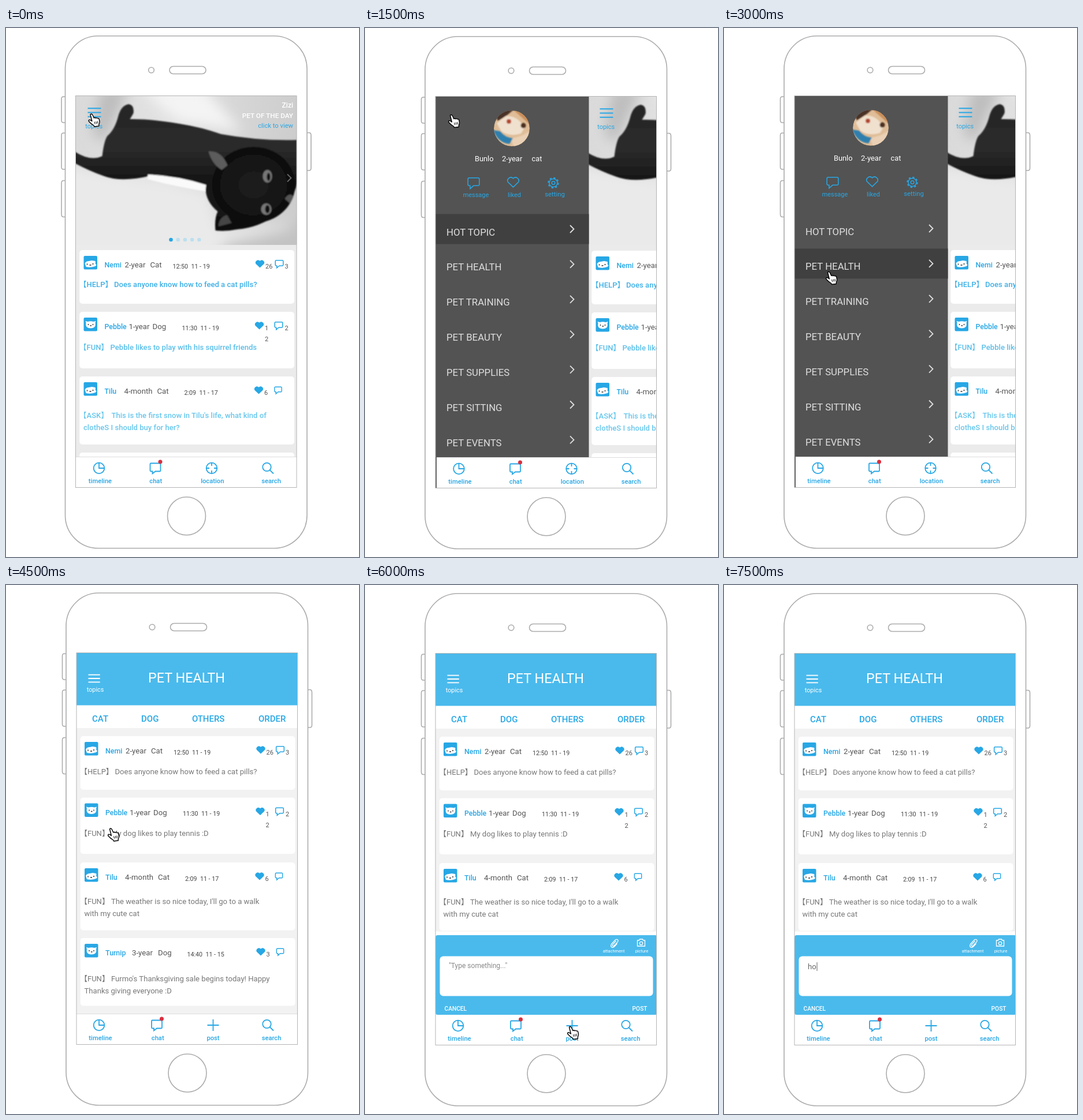
An HTML page for the animation above (8000 ms loop, 611 by 917 pixels).

```html
<!DOCTYPE html>
<html lang="en">
<head>
<meta charset="utf-8">
<title>Pet app walkthrough</title>
<style>
  html, body { margin: 0; width: 100%; height: 100%; overflow: hidden; background: #fff; }
  svg { display: block; width: 100%; height: 100%; }
  text { font-family: Roboto, "Noto Sans CJK SC", "Noto Sans CJK JP", sans-serif; white-space: pre; }
  .line { fill: none; stroke: currentColor; stroke-width: 1.8; }
</style>
</head>
<body>
<svg id="stage" viewBox="0 0 611 917">
  <defs>
    <clipPath id="screen"><rect x="122" y="117" width="383" height="680"/></clipPath>
    <clipPath id="photoClip"><rect x="122" y="118" width="383" height="258"/></clipPath>
    <clipPath id="faceClip"><circle cx="254" cy="173" r="31"/></clipPath>
    <filter id="soft"><feGaussianBlur stdDeviation="1.2"/></filter>
    <filter id="blur"><feGaussianBlur stdDeviation="11"/></filter>
    <linearGradient id="wall"><stop stop-color="#dadada"/><stop offset=".4" stop-color="#e2e2e2"/><stop offset="1" stop-color="#cdcdcd"/></linearGradient>
    <linearGradient id="fur" x2="0" y2="1"><stop stop-color="#262626"/><stop offset=".35" stop-color="#2b2b2b"/><stop offset=".6" stop-color="#161616"/><stop offset="1" stop-color="#101010"/></linearGradient>
    <radialGradient id="head"><stop stop-color="#202020"/><stop offset="1" stop-color="#0e0e0e"/></radialGradient>

    <path id="heart" d="M0 6L-6.5-.3A4 4 0 0 1 0-4.800A4 4 0 0 1 6.5-.3Z"/>
    <path id="bubble" d="M-5-5.5H5Q6.5-5.5 6.5-4V2Q6.5 3.5 5 3.5H0L-4 7V3.5H-5Q-6.5 3.5-6.5 2V-4Q-6.5-5.5-5-5.5Z"/>
    <path id="chevron" class="line" d="M-3.5-6.5L3 0L-3.5 6.5"/>
    <g id="clock" class="line"><circle r="9.3"/><path d="M0-9V0H9"/></g>
    <g id="chat" class="line"><path d="M-7.5-8.5H7.5Q9-8.5 9-7V4Q9 5.5 7.5 5.5H0L-5 9.5V5.5H-7.5Q-9 5.5-9 4V-7Q-9-8.5-7.5-8.5Z"/></g>
    <g id="location" class="line"><circle r="9.3"/><path d="M0-9V-4M0 9V4M-9 0H-4M9 0H4"/></g>
    <g id="search" class="line"><circle cx="-2" cy="-2" r="7.2"/><path d="M3.3 3.3L9.5 9.5"/></g>
    <path id="plus" class="line" d="M-10 0H10M0-10V10"/>
    <g id="gear" class="line" style="stroke-width:1.5"><circle r="2.8"/><circle r="7"/><circle r="8.7" stroke-width="2" stroke-dasharray="3.4 3.43"/></g>
    <path id="clip" class="line" style="stroke-width:1.3" d="M3-4L-3 2.5Q-4 4.5-2 5Q-1 5 0 4L6-2.5Q7.5-5.5 5-6.5Q3-7 1.5-5.5L-5 1.5Q-7 5-4.5 6.8Q-2 8 0 6L5 .5"/>
    <g id="camera" class="line" style="stroke-width:1.3"><path d="M-6.5-4H-3.5L-2.5-6H2.5L3.5-4H6.5V6H-6.5Z"/><circle cy="1" r="2.7"/></g>
    <path id="menu" class="line" style="stroke-width:2" d="M0-7.3H23M0 0H23M0 7.3H23"/>

    <g id="cat">
      <rect width="23.500" height="23.500" rx="2" fill="#27a7e5"/>
      <path fill="#fff" d="M2 13Q4 9 9 9L14 8L20 9Q21 11 20 13L22 16L20 18Q12 21 4 19Z"/>
      <path stroke="#333" stroke-width="1.600" d="M6 13.500v2M16 13v2M10 16h3"/>
    </g>
    <g id="dog">
      <rect width="23.500" height="23.500" rx="2" fill="#27a7e5"/>
      <path fill="#fff" d="M3 6L7 7Q12 5.500 17 7L21 6L20 9Q22 18 12 18.500Q2 18 4 9Z"/>
      <path stroke="#333" stroke-width="1.400" d="M8 11v2M16 11v2M11 14h2.500"/>
    </g>

    <g id="hand" stroke="#000" stroke-linejoin="round" stroke-width="1.4">
      <path fill="#fff" d="M4 2Q6-.5 8 3L10.3 8Q11.8 6.4 13.3 8.2Q15 6.8 16.3 8.6Q18.4 7.8 19.3 10.5L20 14Q20.2 17 18.8 19V22L11 23L10 21Q5.5 18.5 1.5 14Q.3 11.8 2.5 11.2Q4.5 11 6.8 13.5Z"/>
      <path fill="none" stroke-width="1" d="M11 14.5l1.2 4M13.8 14l.9 4M16.4 13.5l.6 4"/>
    </g>

    <g id="phone" fill="#fff" stroke="#acacac" stroke-width="1.6">
      <path d="M104 119H101Q97.5 119 97.5 123V160Q97.5 164 101 164H104M104 182H101Q97.5 182 97.5 186V241Q97.5 245 101 245H104M104 264.5H101Q97.5 264.5 97.5 269V323Q97.5 327.5 101 327.5H104M522 181.5H526Q529.5 181.5 529.5 186V243Q529.5 247 526 247H522"/>
      <rect x="104" y="13.8" width="418.5" height="888" rx="57"/>
      <circle cx="253" cy="73" r="4.8"/>
      <rect x="284.5" y="66.5" width="63" height="13" rx="6.5"/>
      <circle cx="314" cy="846" r="33"/>
    </g>

    <g id="photo" clip-path="url(#photoClip)">
      <rect x="122" y="118" width="383" height="258" fill="url(#wall)"/>
      <g filter="url(#blur)">
        <path fill="#eaeaea" d="M100 235L170 250L260 265L350 285L370 350L520 340L480 400H100Z"/>
        <path fill="#f4f4f4" d="M235 105H345L410 180L300 162Z"/>
        <path fill="#bdbdbd" d="M165 105H215L170 200L150 180Z"/>
        <path fill="#c2c2c2" d="M385 372L490 348L520 325V400H360Z"/>
      </g>
      <g filter="url(#soft)">
        <path fill="url(#fur)" d="M120 214Q148 232 168 222Q171 196 177 187Q190 176 196 152Q201 134 214 132Q224 134 222 148L216 158Q250 157 302 166Q340 172 374 184Q440 196 506 194V268Q498 300 472 322Q440 346 402 349Q382 353 364 351Q362 330 368 318Q346 300 347 275Q300 262 252 256Q202 268 172 257Q146 248 120 234Z"/>
        <ellipse cx="430" cy="272" rx="72" ry="66" fill="url(#head)"/>
        <path fill="#5c5c5c" d="M352 214Q374 212 385 238L375 246Q358 236 352 214Z"/>
        <path fill="#444" d="M369 344Q370 328 384 324L392 338Z"/>
        <path fill="#fafafa" d="M247 254Q300 256 348 272L346 283Q290 274 247 262Z"/>
        <g fill="#777"><ellipse cx="454" cy="257" rx="8" ry="11"/><ellipse cx="452" cy="314" rx="9" ry="10"/></g>
        <g fill="#111"><ellipse cx="456" cy="258" rx="3" ry="7"/><ellipse cx="454" cy="314" rx="4" ry="7"/></g>
        <path fill="#555" d="M484 296Q492 284 499 292L493 304Z"/>
      </g>
    </g>

    <g id="portrait" clip-path="url(#faceClip)">
      <circle cx="254" cy="173" r="31" fill="#dfbd98"/>
      <g filter="url(#soft)">
        <path fill="#4a3327" d="M224 148L242 140H258L246 150L230 160Z"/>
        <path fill="#c98e59" d="M258 142H280L289 170L276 158Z"/>
        <path fill="#f0e1cf" d="M228 164L244 152Q264 150 276 172L270 182Q250 188 236 178Z"/>
        <path fill="#ead0b4" d="M252 190Q272 188 284 178V200L258 206Z"/>
        <path fill="#2d7fae" d="M222 176L234 178Q242 189 256 190L250 200Q230 198 222 176Z"/>
        <circle cx="274" cy="168" r="4.5" fill="#4c2d1c"/><circle cx="249" cy="161" r="4" fill="#b4442d"/>
      </g>
    </g>
  </defs>
</svg>

<script>
const BLUE = '#27a7e5', SKY = '#4abaec';

const text = (x, y, s, size, fill, extra = '') =>
  `<text x="${x}" y="${y}" font-size="${size}" fill="${fill}" ${extra}>${s}</text>`;
const centered = (x, y, s, size, fill) => text(x, y, s, size, fill, 'text-anchor="middle"');
const bold = (x, y, s, size, fill, anchor = 'start') =>
  text(x, y, s, size, fill, `font-weight="500" text-anchor="${anchor}"`);
const rect = (x, y, w, h, fill, rx = 0) =>
  `<rect x="${x}" y="${y}" width="${w}" height="${h}" rx="${rx}" fill="${fill}"/>`;
const icon = (id, x, y, color = BLUE, scale = 1) =>
  `<use href="#${id}" transform="translate(${x} ${y}) scale(${scale})" color="${color}" fill="${color}"/>`;
const outline = (id, x, y, scale, width) =>
  `<use href="#${id}" transform="translate(${x} ${y}) scale(${scale})" fill="none" stroke="${BLUE}" stroke-width="${width}"/>`;
const group = (x, y, content) => `<g transform="translate(${x} ${y})">${content}</g>`;

// Column positions of each author's post header.
const authors = {
  Nemi:   { pet: 'cat', age: '2-year',  kind: 'Cat', cols: [207, 251, 290],   time: '12:50  11 - 19', heart: 441, likes: ['26'],     replies: '3' },
  Pebble: { pet: 'dog', age: '1-year',  kind: 'Dog', cols: [214, 255, 306],   time: '11:30  11 - 19', heart: 440, likes: ['1', '2'], replies: '2' },
  Tilu:   { pet: 'cat', age: '4-month', kind: 'Cat', cols: [206, 263, 310],   time: '2:09  11 - 17',  heart: 439, likes: ['6'],      replies: '' },
  Turnip: { pet: 'dog', age: '3-year',  kind: 'Dog', cols: [218, 263, 313.5], time: '14:40  11 - 15', heart: 441, likes: ['3'],      replies: '' },
};

function post(name, y, height, tag, lines, offset, color, weight) {
  const a = authors[name], grey = '#555';
  const style = `font-weight="${weight}"`;
  const messageX = { HELP: 188.5, FUN: 182, ASK: 184 }[tag];
  return rect(128.7, y, 371.8, height, '#fff', 5) + icon(a.pet, 136, y + 10) +
    bold(172, y + 30, name, 12.4, BLUE) +
    text(a.cols[0], y + 30, a.age, 13.2, grey) + text(a.cols[1], y + 30, a.kind, 13.2, grey) +
    text(a.cols[2], y + 31.5, a.time, 10.7, '#444') +
    icon('heart', a.heart, y + 24, BLUE, 1.1) +
    a.likes.map((n, i) => text(a.heart + 9.5, y + 32 + i * 19, n, 11, grey)).join('') +
    outline('bubble', a.heart + 33.5, y + 23.5, a.replies ? 1.05 : .95, 1.5) +
    text(484, y + 32, a.replies, 11, grey) +
    text(128, y + offset, `【${tag}】`, 13, color, style) +
    lines.map((s, i) => text(i ? 135.5 : messageX, y + offset + i * 21.7, s, 13.1, color, style)).join('');
}

const tabs = (items, x = 122) => rect(x, 743.5, 505 - x, 53, '#fff') + rect(x, 743, 505 - x, 1, '#ddd') +
  items.map(([id, iconX, label, labelX]) =>
    icon(id, iconX, 763) + bold(labelX, 789, label, 11.2, BLUE, 'middle') +
    (id === 'chat' ? `<circle cx="${iconX + 8.5}" cy="752" r="3.5" fill="#d9303e"/>` : '')).join('');
const feedTabs = [['clock', 162.5, 'timeline', 164.5], ['chat', 260, 'chat', 260.7],
  ['location', 357.5, 'location', 358.8], ['search', 455, 'search', 460.5]];
const healthTabs = [['clock', 161, 'timeline', 163.5], ['chat', 261, 'chat', 262.7],
  ['plus', 358.5, 'post', 358.5], ['search', 453.5, 'search', 459.5]];

const feed = rect(122, 376, 383, 368, '#ebebeb') + '<use href="#photo"/>' +
  icon('menu', 143, 146.5) + centered(153.7, 173.5, 'topics', 11, BLUE) +
  bold(498.5, 137.5, 'Zizi', 12, '#fff', 'end') +
  bold(498.5, 155.5, 'PET OF THE DAY', 11.8, '#fff', 'end') +
  text(498.5, 173, 'click to view', 11.2, BLUE, 'text-anchor="end"') +
  icon('chevron', 492, 260, '#686868') +
  [0, 1, 2, 3, 4].map(i => `<circle cx="${287 + i * 12.2}" cy="367" r="3.3" fill="${i ? '#bcdff0' : BLUE}"/>`).join('') +
  post('Nemi', 385, 93, 'HELP', ['Does anyone know how to feed a cat pills?'], 63.5, '#3db0e6', 500) +
  post('Pebble', 492, 98, 'FUN', ['Pebble likes to play with his squirrel friends'], 65.5, '#5abfe9', 500) +
  post('Tilu', 604, 118, 'ASK', ["This is the first snow in Tilu's life, what kind of", 'clotheS I should buy for her?'], 71.5, '#68c7ec', 500) +
  rect(128.7, 736, 371.8, 20, '#fff', 5);

const topics = ['HOT TOPIC', 'PET HEALTH', 'PET TRAINING', 'PET BEAUTY', 'PET SUPPLIES', 'PET SITTING', 'PET EVENTS'];

const home = () => feed + tabs(feedTabs);

const drawer = selected => group(263.5, 0, feed) +
  rect(122, 118, 265.5, 679, '#535353') + '<use href="#portrait"/>' +
  text(190, 230, 'Bunlo', 12.8, '#fff') + text(237, 230, '2-year', 13, '#fff') + text(288.5, 230, 'cat', 12.8, '#fff') +
  outline('bubble', 188, 267, 1.52, 1) + outline('heart', 256.5, 266.5, 1.4, 1.1) + icon('gear', 326, 267.5) +
  centered(192, 292, 'message', 10.9, BLUE) + centered(258.5, 292, 'liked', 11, BLUE) +
  centered(328.5, 291, 'setting', 11.3, BLUE) +
  rect(122, 321.5 + selected * 60.9, 265.5, 52, '#404040') +
  topics.map((s, i) => text(141, 358.5 + i * 60.9, s, 16.8, '#dedede') +
    icon('chevron', 358.5, 347.5 + i * 60.9, '#dedede')).join('') +
  tabs(feedTabs, 124);

const health = () => rect(122, 117, 383, 92, SKY) + rect(122, 208.5, 383, 40, '#fff') + rect(122, 248, 383, 496, '#f2f2f2') +
  icon('menu', 142.5, 162, '#fff', .88) + centered(154.5, 185, 'topics', 10.8, '#fff') +
  text(246, 168.7, 'PET HEALTH', 23.4, '#fff') +
  [['CAT', 149], ['DOG', 234], ['OTHERS', 322], ['ORDER', 437]].map(([s, x]) => bold(x, 236.8, s, 15, BLUE)).join('') +
  post('Nemi', 262, 93, 'HELP', ['Does anyone know how to feed a cat pills?'], 65.5, '#777', 400) +
  post('Pebble', 368.5, 97.5, 'FUN', ['My dog likes to play tennis :D'], 66, '#777', 400) +
  post('Tilu', 481, 117.5, 'FUN', ["The weather is so nice today, I'll go to a walk", 'with my cute cat'], 71.5, '#777', 400) +
  post('Turnip', 612, 117.5, 'FUN', ["Furmo's Thanksgiving sale begins today! Happy", 'Thanks giving everyone :D'], 74.5, '#777', 400) +
  tabs(healthTabs);

const composer = draft => health() + rect(122, 599.5, 383, 144, '#fff') + rect(122, 606, 384, 138, SKY, 4) +
  rect(129.5, 642.5, 369, 69, '#fff', 6) +
  icon('clip', 431.5, 620, '#fff') + icon('camera', 478, 619, '#fff') +
  centered(430.5, 636, 'attachment', 7.4, '#fff') + centered(479, 636, 'picture', 7.4, '#fff') +
  bold(137.5, 737, 'CANCEL', 10.2, '#fff') + bold(488.5, 737, 'POST', 10.2, '#fff', 'end') +
  (draft ? text(145, 665, draft, 13.2, '#666') + rect(160.5, 653, 1, 15, '#666')
         : text(145, 662.5, '"Type something..."', 12, '#888'));

const scenes = [
  { start: 0,    x: -1.5, y: 0, page: home(),         hand: [142, 148] },
  { start: 1500, x: 0,    y: 1, page: drawer(0),      hand: [143.5, 149.5] },
  { start: 3000, x: 0,    y: 0, page: drawer(1),      hand: [175.5, 421.5] },
  { start: 4500, x: 0,    y: 0, page: health(),       hand: [175.5, 421] },
  { start: 6000, x: 0,    y: 1, page: composer(''),   hand: [349.5, 764.5] },
  { start: 7500, x: 0,    y: 1, page: composer('ho') },
];

const stage = document.getElementById('stage');
stage.insertAdjacentHTML('beforeend', scenes.map(s => '<g class="scene">' +
  group(s.x, s.y, `<use href="#phone"/><g clip-path="url(#screen)">${s.page}</g>` +
    '<rect x="122" y="117.5" width="382.5" height="679" fill="none" stroke="#b5b5b5"/>') +
  (s.hand ? icon('hand', ...s.hand) : '') + '</g>').join(''));
const layers = [...stage.querySelectorAll('.scene')];

function frame() {
  const time = performance.now() % 8000;
  const current = scenes.findLastIndex(s => s.start <= time);
  layers.forEach((layer, i) => layer.setAttribute('display', i === current ? 'inline' : 'none'));
  requestAnimationFrame(frame);
}
frame();
</script>
</body>
</html>
```
